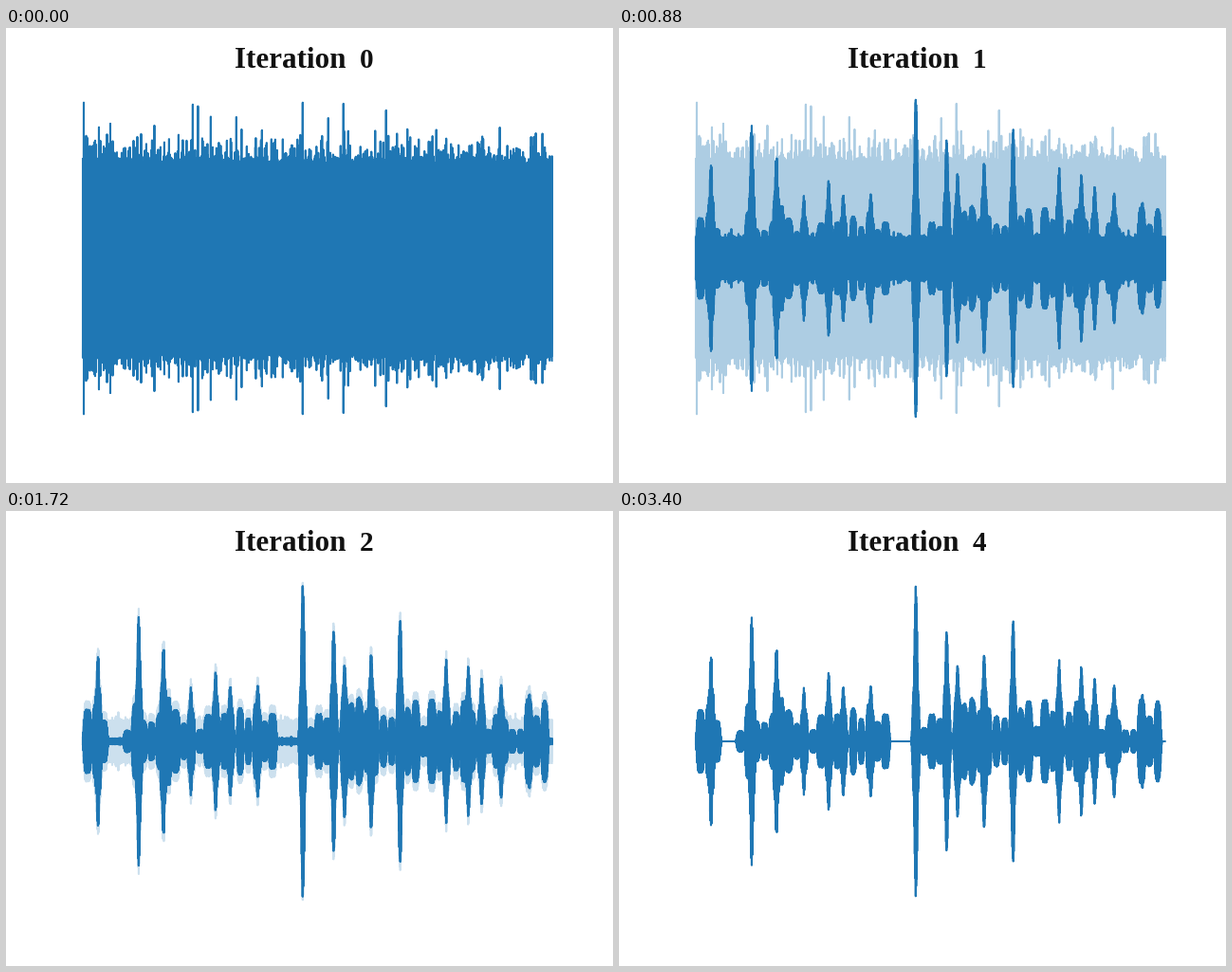
A matplotlib script for the animation above (4000 ms loop, 640 px wide and 480 px high).

```python
import numpy as np
import matplotlib.pyplot as plt
from matplotlib.animation import FuncAnimation

W, H, DPI = 640, 480, 100
FRAMES, INTERVAL = 100, 40
MID, PEAK = 243, 168
BLUE = "#1f77b4"

# First frame and number of steps of each cross-fade
FADES = [(16, 11), (37, 9), (57, 9), (77, 9)]

# Spoken phrases, with silence between them: start, end
PHRASES = [(83, 111), (125, 283), (310, 571)]

# Loudest syllables: x, height
ACCENTS = [(97, 93), (140, 136), (166, 103), (195, 58), (221, 74),
           (236.5, 61), (265.5, 61), (313, 168), (345.5, 121), (357, 86),
           (385, 97), (415.5, 135), (464, 88), (487.5, 82), (501.5, 69),
           (522, 64), (552, 52)]

rng = np.random.default_rng(7)
x = np.linspace(81, 575.6, 991)


def burst(cx, height, width, power):
    return height * np.exp(-np.abs((x - cx) / width) ** power)


def clean_signal():
    env = np.ones_like(x)
    for start, end in PHRASES:
        for cx in np.arange(start + 3, end, 8.5):
            height, width = rng.uniform(12, 48), rng.uniform(3, 4.5)
            env = np.maximum(env, burst(cx, height, width, 5))
    for cx, height in ACCENTS:
        body = burst(cx, min(0.62 * height, 64), 3.8, 5)
        env = np.maximum(env, body)
        env = np.maximum(env, burst(cx, height, 2.2, 2))
    return 1 + (env - 1) * rng.uniform(0.92, 1, x.size)


def noise_signal():
    env = 98 + rng.exponential(8.5, x.size)
    for cx in (82, 197, 202.5, 313, 356):
        env[np.argmin(np.abs(x - cx))] = rng.uniform(160, PEAK)
    return env


def floor(level, spread):
    return level + rng.exponential(spread, x.size)


clean = clean_signal()
waves = [noise_signal(),
         np.maximum(floor(21.5, 1.3), clean + 9),
         np.maximum(floor(3.2, 0.4), clean),
         np.maximum(floor(0.6, 0.3), clean),
         np.maximum(0.4, clean - 0.3)]
waves = [np.clip(w, 0, PEAK) - 0.7 for w in waves]

plt.rcParams["path.simplify"] = False
fig = plt.figure(figsize=(W / DPI, H / DPI), dpi=DPI, facecolor="white")
ax = fig.add_axes([0, 0, 1, 1])
ax.set_xlim(0, W)
ax.set_ylim(H, 0)
ax.axis("off")


def label(px, py, text, size):
    return ax.text(px, py, text, family="Liberation Serif", weight="bold",
                   size=size, color="#111111", va="baseline", ha="left")


def mirror(env):
    """Swing to both sides of the middle line at every sample."""
    return np.column_stack([MID - env, MID + env]).ravel()


label(240.5, 41.5, "Iteration", 22.4)
digit = label(373, 42.5, "0", 21)
incoming, outgoing, shared = (
    ax.plot(np.repeat(x, 2), mirror(0 * x), color=BLUE, lw=1.5)[0]
    for _ in range(3))


def show(line, env, alpha):
    line.set_ydata(mirror(env))
    line.set_alpha(alpha)


def state(frame):
    """Return the wave fading out, the one fading in and the progress."""
    old, new, t = 0, 0, 1.0
    for i, (start, steps) in enumerate(FADES):
        if frame >= start:
            old, new = i, i + 1
            t = min(1.0, (frame - start + 1) / steps)
    return old, new, t


def update(frame):
    old, new, t = state(frame)
    show(incoming, waves[new], min(1.0, 1.6 * t))
    show(outgoing, waves[old], 1 - t)
    # Where both waves overlap the colour stays solid
    show(shared, np.minimum(waves[old], waves[new]), 1.0 if t < 1 else 0.0)
    digit.set_text(str(new if t > 0.5 else old))
    return incoming, outgoing, shared, digit


anim = FuncAnimation(fig, update, frames=FRAMES, interval=INTERVAL,
                     repeat=True, repeat_delay=0, blit=False)
plt.show()
```
